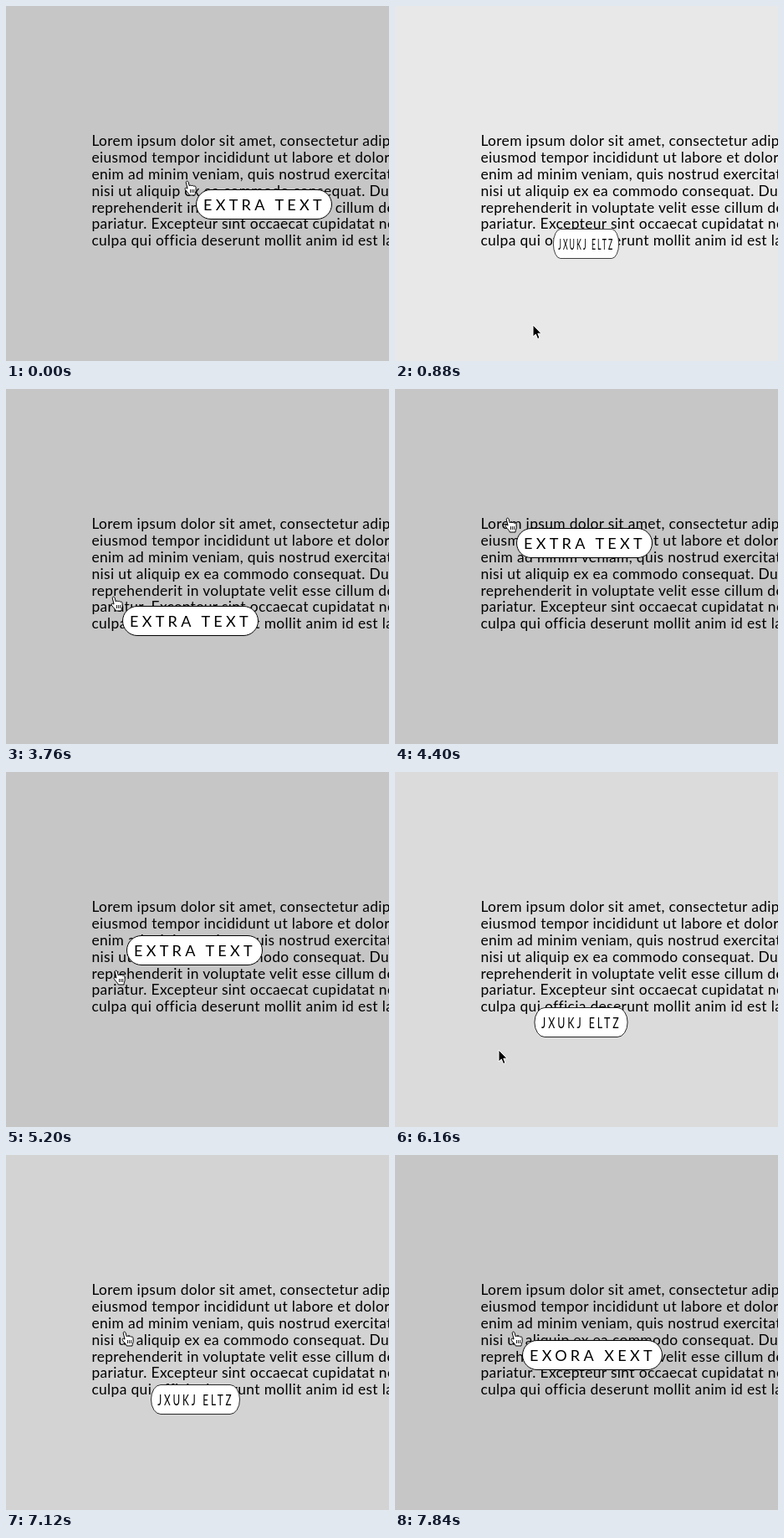
Write an HTML page that moves like this. It is 458 px wide and 424 px high and loops after 8000 ms.

```html
<!DOCTYPE html>
<html lang="en">
<head>
<meta charset="utf-8">
<title>Hover reveal</title>
<style>
  html, body { margin: 0; width: 100%; height: 100%; overflow: hidden; }
  body { position: relative; background: #c5c6c5; color: #000; font-family: Lato, "Open Sans", sans-serif; }
  #copy {
    position: absolute; left: 102.4px; top: 151.3px; white-space: pre;
    font-size: 17.4px; line-height: 19.83px; letter-spacing: .36px;
  }
  #pill {
    position: absolute; left: 0; top: 0; box-sizing: border-box;
    min-width: 163px; height: 36px; padding: 0 7px 0 8px;
    border: 1px solid #000; border-radius: 18px; background: #fff;
    font-size: 18px; line-height: 34px; letter-spacing: 4.3px;
    text-align: center; white-space: pre;
  }
  svg { position: absolute; left: 0; top: 0; overflow: visible; }
</style>
</head>
<body>
<div id="copy">Lorem ipsum dolor sit amet, consectetur adipisicing elit, sed do
eiusmod tempor incididunt ut labore et dolore magna aliqua. Ut
enim ad minim veniam, quis nostrud exercitation ullamco laboris
nisi ut aliquip ex ea commodo consequat. Duis aute irure dolor in
reprehenderit in voluptate velit esse cillum dolore eu fugiat nulla
pariatur. Excepteur sint occaecat cupidatat non proident, sunt in
culpa qui officia deserunt mollit anim id est laborum.</div>
<div id="pill"></div>
<svg id="hand" width="17" height="20">
  <path fill="#fff" stroke="#000" stroke-linejoin="round" d="M5 10.7L3.3 4C2.9 2 5.3 1.4 6 3.2L7.3 8C7.6 6.9 9.6 6.8 10 8C10.6 7 12.4 7.2 12.6 8.4C13.3 7.6 14.9 8 15 9.4L15.2 13.5C15 15.5 14 16.5 14 19H7.3C7 17 4.5 15.5 2.6 12.6C1 10.4 3.2 9.3 5 11.2Z"/>
  <path stroke="#000" stroke-width=".9" d="M8.5 12v4M10.6 12v4M12.7 12v4"/>
</svg>
<svg id="arrow" width="12" height="18">
  <path stroke="#fff" d="M0 0V14L3.3 11L5.5 16.5L8 15.5L5.8 10.2H10Z"/>
</svg>
<script>
const LOOP = 8000, STEP = 80;
const TEXT_BOTTOM = 290;
const LAG = 400, SHADE_TIME = 290, SCALE_TIME = 325;
const WORD = "EXTRA TEXT", NOISE = "JXUKJ ELTZ", POOL = "KJXUELTOZ";
const $ = id => document.getElementById(id);

// Cursor strokes: start, end, dx, dy. Overlapping strokes add up to curves.
const home = [212, 207];
const strokes = [
  [320, 700, -88, 10], [560, 880, 0, 164], [700, 880, 41, 0],
  [1580, 1980, -41, -134],
  [3700, 4180, 6, -95], [4760, 5400, -3, 95],
  [5740, 6360, -3, 98], [6720, 7160, 13, -136]
];

const clamp = x => Math.min(1, Math.max(0, x));
const cubic = x => x < .5 ? 4 * x ** 3 : 1 - 4 * (1 - x) ** 3;
const sine = x => .5 - .5 * Math.cos(Math.PI * clamp(x));

function cursorAt(t) {
  let [x, y] = home;
  for (const [from, to, dx, dy] of strokes) {
    const e = cubic(clamp((t - from) / (to - from)));
    x += dx * e;
    y += dy * e;
  }
  return [x, y];
}

// Moments at which the cursor enters or leaves the text.
const hovers = [{ start: -LOOP, open: true }];
for (let t = 0; t < LOOP; t++) {
  const open = cursorAt(t)[1] < TEXT_BOTTOM;
  if (open !== hovers[hovers.length - 1].open) hovers.push({ start: t, open });
}
const hoverAt = t => hovers.filter(h => h.start <= t).pop();

// The pill trails the cursor and aims at the exit point while it is outside.
function pillAt(t) {
  const samples = 40;
  let px = 0, py = 0;
  for (let i = 0; i < samples; i++) {
    const then = t - LAG * i / samples;
    const { start, open } = hoverAt(then);
    const [x, y] = cursorAt(open ? then : start);
    px += x / samples;
    py += y / samples;
  }
  return [px + 15, py + 12];
}

// Letters churn after a pause and settle in four interleaved groups.
function labelAt(age, open) {
  if (!open || age < 400) return NOISE;
  const turn = Math.floor(age / 160);
  return [...WORD].map((letter, i) => {
    const settled = age >= 450 + 225 * ((i + 1) % 4);
    return settled || letter === " " ? letter : POOL[(i + turn) % POOL.length];
  }).join("");
}

const move = ([x, y]) => `translate(${Math.round(x)}px, ${Math.round(y)}px)`;

function draw(t) {
  const { start, open } = hoverAt(t), age = t - start;
  const level = time => open ? sine(age / time) : 1 - sine(age / time);
  const shade = level(SHADE_TIME), scale = level(SCALE_TIME);
  const mix = end => Math.round(253 + (end - 253) * shade);
  document.body.style.background = `rgb(${mix(197)}, ${mix(198)}, ${mix(197)})`;

  const pill = $("pill");
  pill.textContent = labelAt(age, open);
  pill.style.transform = `${move(pillAt(t))} scaleX(${scale})`;
  pill.style.visibility = scale > .04 ? "visible" : "hidden";

  $("hand").style.transform = $("arrow").style.transform = move(cursorAt(t));
  $("hand").style.display = open ? "block" : "none";
  $("arrow").style.display = open ? "none" : "block";
}

const origin = performance.now();
function tick() {
  const t = (performance.now() - origin) % LOOP;
  draw(Math.floor(t / STEP) * STEP);
  requestAnimationFrame(tick);
}
tick();
</script>
</body>
</html>
```
